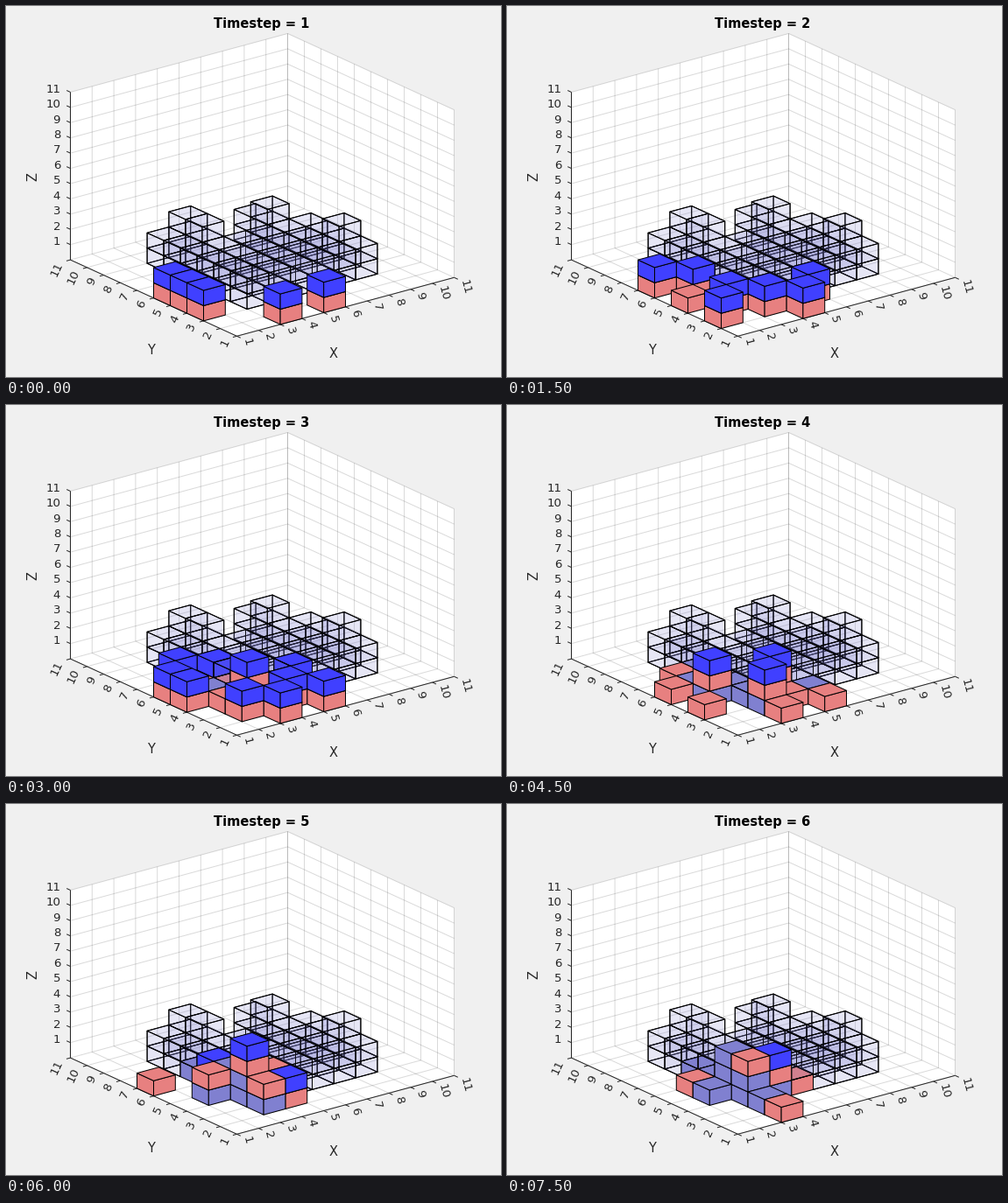
Recreate the animation shown at these times as a matplotlib script. Size 565 px wide and 424 px high, loop 8000 ms.

```python
import numpy as np
import matplotlib.pyplot as plt
from matplotlib.animation import FuncAnimation
from matplotlib.collections import LineCollection, PolyCollection

W, H, DPI = 565, 424, 100
PX = 72 / DPI                      # points per pixel
STEP_MS, TICK_MS, LOOP_MS = 1500, 500, 8000

RED, BLUE = (0.906, 0.502, 0.502), (0.25, 0.25, 1.0)
PLACED, GHOST = (0.5, 0.5, 0.815), (0.5, 0.5, 0.815, 0.1)
INK = (0.15, 0.15, 0.15)

ORIGIN = np.array([263.5, 377.3])
EX, EY, EZ = np.array([[24.8, -6.7], [-19.0, -8.72], [0, -17.42]])


def project(x, y, z=0):
    return ORIGIN + (x - 1) * EX + (y - 1) * EY + z * EZ


# Cells (x, y) of carrying robots, empty robots, added and removed blocks
STEPS = [
    dict(loaded=[(3, 1), (5, 1), (1, 3), (1, 4), (1, 5)]),
    dict(loaded=[(1, 6), (2, 5), (1, 2), (2, 3), (3, 2), (4, 1), (5, 2)],
         empty=[(1, 4)]),
    dict(loaded=[(1, 5), (1, 4), (2, 6), (3, 5), (3, 3), (2, 2), (3, 1),
                 (5, 1), (4, 2), (5, 3)],
         empty=[(2, 3)], add=[(2, 4), (3, 3)]),
    dict(loaded=[(2, 4), (3, 2), (4, 3)],
         empty=[(2, 6), (1, 5), (1, 3), (3, 1), (5, 1), (4, 2)],
         add=[(3, 2), (4, 3), (3, 4), (5, 2), (2, 5), (3, 6)]),
    dict(loaded=[(3, 5), (3, 3), (4, 2)],
         empty=[(1, 6), (2, 4), (4, 3), (3, 2)],
         add=[(3, 4), (3, 3)], remove=[(5, 2), (2, 5)]),
    dict(loaded=[(4, 3)], empty=[(2, 5), (3, 1), (3, 3), (5, 3)],
         add=[(3, 4), (3, 5)]),
]


def plan_cells():
    """Voxels of the structure still to be built."""
    heights = {(x, y): 2 for x in range(3, 9) for y in range(3, 7)}
    heights.update({(3, 7): 2, (3, 8): 2, (7, 8): 2})
    heights.update({cell: 3 for cell in [(4, 7), (4, 8), (7, 7), (8, 4)]})
    return {(x, y, z) for (x, y), h in heights.items() for z in range(h)}


PLAN = plan_cells()


def solid_cells(step):
    """Map every opaque voxel at a step to its colour."""
    height = {}
    for change in STEPS[:step + 1]:
        for cell in change.get("add", []):
            height[cell] = height.get(cell, 0) + 1
        for cell in change.get("remove", []):
            height[cell] -= 1
    solid = {(x, y, z): PLACED
             for (x, y), h in height.items() for z in range(h)}
    now = STEPS[step]
    for x, y in now["loaded"] + now.get("empty", []):
        z = height.get((x, y), 0)
        solid[x, y, z] = RED
        if (x, y) in now["loaded"]:
            solid[x, y, z + 1] = BLUE
    return solid


def face(cell, axis, side):
    """Corners of one cube face, perpendicular to an axis."""
    corners = []
    for u, v in [(0, 0), (1, 0), (1, 1), (0, 1)]:
        offset = [u, v]
        offset.insert(axis, side)
        corners.append(project(*np.add(cell, offset)))
    return corners


NEAR = [(0, 0), (1, 0), (2, 1)]
FAR = [(0, 1), (1, 1), (2, 0)]


def scene(step):
    """Faces and colours from back to front."""
    solid = solid_cells(step)
    ghosts = PLAN - set(solid)
    polys, colors = [], []
    for cell in sorted(ghosts | set(solid), key=lambda c: (-c[0], -c[1], c[2])):
        sides = NEAR
        if cell in ghosts:
            outer = []
            for axis, side in FAR:
                beside = list(cell)
                beside[axis] += 1 if side else -1
                if tuple(beside) not in ghosts:
                    outer.append((axis, side))
            sides = outer + NEAR
        for axis, side in sides:
            polys.append(face(cell, axis, side))
            colors.append(solid.get(cell, GHOST))
    return polys, [c if len(c) == 4 else (*c, 1) for c in colors]


fig = plt.figure(figsize=(W / DPI, H / DPI), dpi=DPI, facecolor="#f0f0f0")
ax = fig.add_axes([0, 0, 1, 1])
ax.set(xlim=(0, W), ylim=(H, 0))
ax.axis("off")
plt.rcParams["font.family"] = "DejaVu Sans"


def label(point, text, size=13.33, **style):
    style = {"color": INK, "ha": "center", "va": "center", **style}
    return ax.text(*point, text, fontsize=size * PX, **style)


def draw_axes():
    hull = [(1, 1, 0), (1, 11, 0), (1, 11, 11), (11, 11, 11), (11, 1, 11),
            (11, 1, 0)]
    ax.add_patch(plt.Polygon([project(*p) for p in hull], fc="white", ec="none",
                             zorder=0))
    grid, axes = [], []
    for n in range(1, 12):
        grid += [
            [project(n, 1), project(n, 11), project(n, 11, 11)],
            [project(1, n), project(11, n), project(11, n, 11)],
            [project(1, 11, n), project(11, 11, n), project(11, 1, n)],
        ]
    ax.add_collection(LineCollection(grid, colors=[(*INK, 0.17)],
                                     linewidths=PX, zorder=1))

    axes.append([project(11, 1), project(1, 1), project(1, 11),
                 project(1, 11, 11)])
    out_x = -EY / np.hypot(*EY) * 4.7
    out_y = -EX / np.hypot(*EX) * 4.7
    for n in range(1, 12):
        px, py, pz = project(n, 1), project(1, n), project(1, 11, n)
        axes += [[px, px + out_x], [py, py + out_y], [pz, pz - out_x]]
        label(px + (10, 3.2), n, rotation=-75, ha="left",
              rotation_mode="anchor")
        label(py + (-12, 3.2), n, rotation=65, ha="right",
              rotation_mode="anchor")
        label(pz + (-11.3, -3.2), n, ha="right")
    ax.add_collection(LineCollection(axes, colors=[INK], linewidths=PX,
                                     zorder=2))
    label((374, 397), "X", 14.67)
    label((165, 394), "Y", 14.67)
    label((30.5, 195), "Z", 14.67, rotation=90)


draw_axes()
title = label((291.5, 25), "", 14.67, color="black", weight="bold",
              va="baseline")
cubes = PolyCollection([], edgecolors="black", linewidths=PX, zorder=3,
                       joinstyle="round")
ax.add_collection(cubes, autolim=False)


def update(i):
    step = i * TICK_MS // STEP_MS
    polys, colors = scene(step)
    cubes.set_verts(polys)
    cubes.set_facecolor(colors)
    title.set_text(f"Timestep = {step + 1}")
    return cubes, title


anim = FuncAnimation(fig, update, frames=LOOP_MS // TICK_MS, interval=TICK_MS,
                     init_func=lambda: update(0), repeat=True, repeat_delay=0)
plt.show()
```
